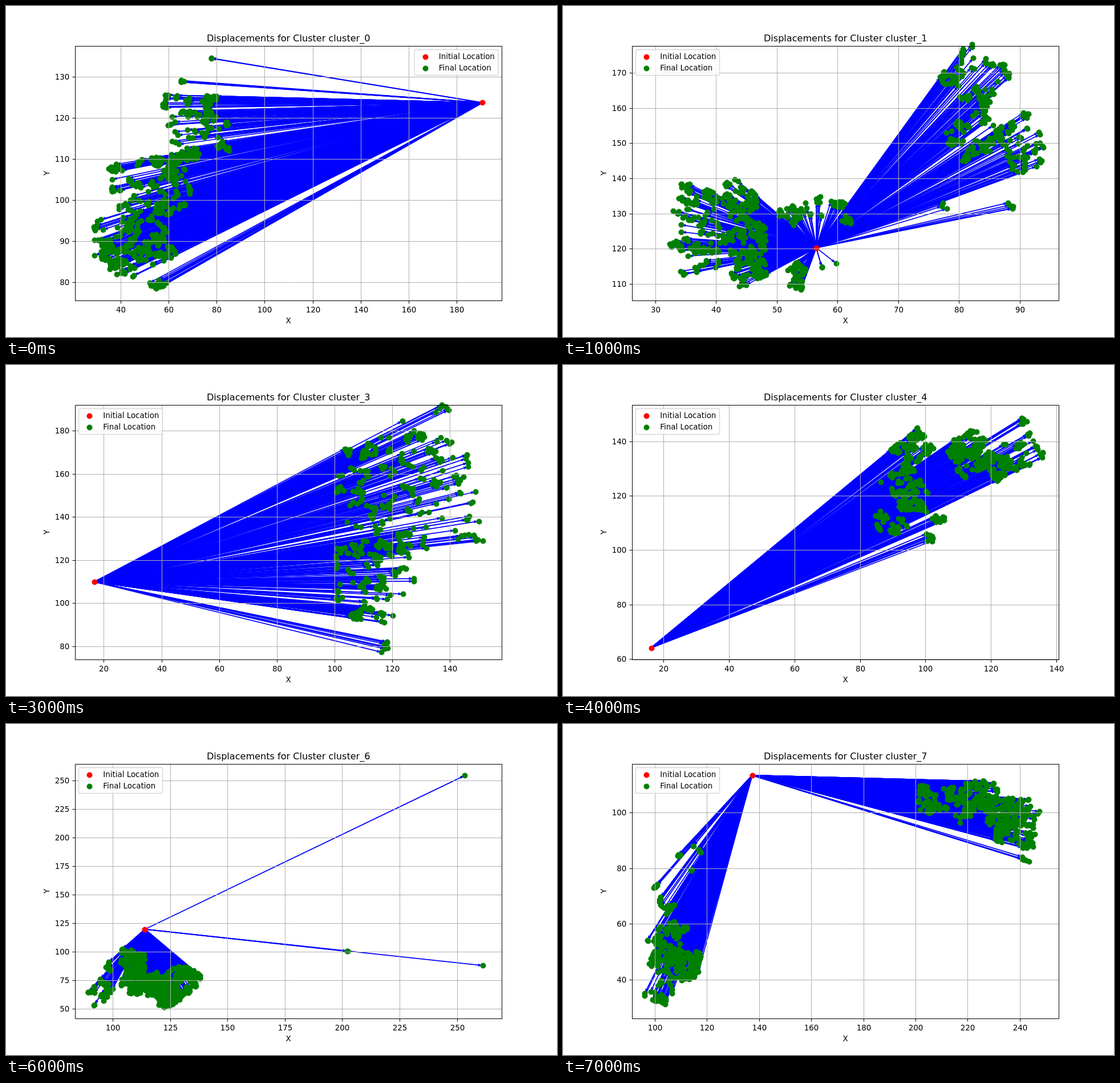
Animation, 966 px wide and 580 px high, one loop 8 s. Source, as an HTML page with a canvas:

```html
<!DOCTYPE html>
<html lang="en">
<head>
<meta charset="utf-8">
<title>Cluster displacements</title>
<style>
html, body { margin: 0; width: 966px; height: 580px; overflow: hidden; background: #fff; }
canvas { display: block; }
</style>
</head>
<body>
<canvas id="stage" width="966" height="580"></canvas>
<script>
const ctx = document.getElementById('stage').getContext('2d');
const FRAME = { left: 120.8, top: 69.6, right: 869.4, bottom: 515.8 };
const FONT = '"DejaVu Sans", sans-serif';
const SHAFT = 1.75, DOT = 5, SCENE_MS = 1000, CLUMPING = 0.6, CLUMP_STEP = 14;
const DEGREE = Math.PI / 180;

// Axis: lowest value, highest value, tick step.
// Spray around the origin: from angle, to angle, from distance, to distance, dots.
const scenes = [
  {
    x: [20.94, 198.88, 20], y: [75.63, 137.55, 10], origin: [835.4, 169.3], legendX: 716,
    sprays: [
      [169, 181.4, 447, 560, 150], [160.5, 170.5, 535, 668, 190], [153.5, 163, 600, 715, 170],
      [155.8, 160.5, 685, 722, 70], [150.2, 151.6, 638, 668, 14], [183.9, 184.2, 520, 530, 5],
      [189.2, 189.5, 480, 482, 2], [158.5, 158.5, 731, 731, 1]
    ]
  },
  {
    x: [26.13, 96.47, 10], y: [105.36, 177.68, 10], origin: [443.9, 423.6], legendX: 127.5,
    sprays: [
      [-54, -40, 365, 460, 100], [-42, -29, 295, 390, 90], [-34, -20, 370, 440, 85],
      [-20, -16.5, 232, 243, 4], [-13.2, -11.2, 345, 355, 5], [-74, -54, 80, 92, 14],
      [-48, -35, 65, 78, 12], [-140, -80, 56, 92, 45], [167, 208, 90, 262, 270],
      [205, 221, 125, 195, 60], [152, 168, 95, 155, 60], [110, 146, 42, 88, 40],
      [74, 74, 35, 36, 2], [38, 38, 44, 44, 1]
    ]
  },
  {
    x: [13.19, 89, 10], y: [118.45, 169.53, 10], origin: [154.8, 137.3], legendX: 127.5,
    sprays: [
      [-3, 31.5, 262, 520, 270], [30, 34, 330, 400, 14], [-5, 4, 510, 590, 75],
      [2, 16, 500, 580, 60], [13, 30, 500, 600, 90], [17, 28, 600, 725, 75],
      [35, 35, 542, 542, 1], [37.7, 37.7, 586, 586, 1]
    ]
  },
  {
    x: [10, 158, 20], y: [74, 192, 20], origin: [154.8, 380], legendX: 127.5,
    sprays: [[-28, -5, 450, 690, 260], [-8, 8, 420, 560, 140], [10, 14, 500, 530, 8]]
  },
  {
    x: [10.29, 140.82, 20], y: [59.83, 153.52, 20], origin: [154.8, 495.5], legendX: 127.5,
    sprays: [
      [-39.6, -35, 545, 605, 90], [-36, -27, 495, 555, 90], [-31, -25, 450, 540, 65],
      [-25.5, -23.5, 530, 575, 12], [-24, -20.8, 518, 530, 10], [-34.5, -28.5, 620, 690, 130],
      [-30, -25.8, 670, 745, 85], [-31.8, -31, 755, 772, 9], [-29.6, -25.8, 758, 768, 16]
    ]
  },
  {
    x: [48, 184, 20], y: [34, 140, 20], origin: [835.4, 420], legendX: 127.5,
    sprays: [[181, 207, 420, 600, 280], [178, 190, 560, 680, 130], [209, 213, 500, 530, 8]]
  },
  {
    x: [83.55, 269.58, 25], y: [41.59, 264.96, 25], origin: [243.4, 359.7], legendX: 127.5,
    sprays: [
      [90, 140, 44, 72, 90], [70, 115, 75, 115, 190], [40, 80, 85, 135, 230],
      [64, 76, 125, 140, 30], [118, 132, 115, 148, 35], [130, 144, 82, 95, 10],
      [123.8, 123.8, 158, 160, 2], [-25.66, -25.66, 622.4, 622.4, 1],
      [6.1, 6.4, 356, 358, 2], [6.12, 6.12, 596, 596, 1]
    ]
  },
  {
    x: [91.2, 255, 20], y: [25.99, 117.52, 20], origin: [331.6, 89.8], legendX: 127.5,
    sprays: [
      [106, 119, 330, 380, 150], [113, 122.5, 290, 345, 50], [110, 117, 380, 430, 38],
      [105.3, 108, 325, 370, 28], [121, 127, 265, 288, 18], [130, 133.3, 185, 192, 5],
      [122.6, 131, 158, 163, 5], [122.5, 123, 195, 198, 3], [130, 131.3, 240, 262, 5],
      [3.5, 12, 295, 360, 70], [1.5, 13, 355, 430, 120], [5, 15, 420, 508, 200],
      [16.8, 17.3, 487, 508, 6]
    ]
  }
];

function seeded(seed) {
  let state = seed * 7919 + 17;
  return () => (state = (state * 16807) % 2147483647) / 2147483647;
}

const clamp = (v, lo, hi) => Math.min(hi, Math.max(lo, v));
const snap = v => Math.round(v) + 0.5;

// Many dots stay close to the one before, which gives small clumps.
function spray([ox, oy], [from, to, near, far, count], random) {
  let angle, distance;
  return Array.from({ length: count }, (_, i) => {
    const u = random(), v = random();
    if (i > 0 && random() < CLUMPING) {
      const turn = (u - 0.5) * CLUMP_STEP / distance / DEGREE;
      angle = clamp(angle + turn, from, to);
      distance = clamp(distance + (v - 0.5) * CLUMP_STEP, near, far);
    } else {
      angle = from + u * (to - from);
      distance = near + v * (far - near);
    }
    return [ox + distance * Math.cos(angle * DEGREE), oy + distance * Math.sin(angle * DEGREE)];
  });
}

function arrow([x0, y0], [x1, y1]) {
  const length = Math.hypot(x1 - x0, y1 - y0);
  const half = SHAFT / 2, neck = length - 4.5 * SHAFT, barb = length - 5 * SHAFT;
  const outline = [[0, -half], [neck, -half], [barb, -3 * half], [length, 0],
    [barb, 3 * half], [neck, half], [0, half]];
  ctx.save();
  ctx.translate(x0, y0);
  ctx.rotate(Math.atan2(y1 - y0, x1 - x0));
  ctx.beginPath();
  outline.forEach(([x, y]) => ctx.lineTo(x, y));
  ctx.fill();
  ctx.restore();
}

function dot([x, y], color) {
  ctx.fillStyle = color;
  ctx.beginPath();
  ctx.arc(snap(x), snap(y), DOT, 0, Math.PI * 2);
  ctx.fill();
}

function line(x0, y0, x1, y1, color) {
  ctx.strokeStyle = color;
  ctx.lineWidth = 1;
  ctx.beginPath();
  ctx.moveTo(x0, y0);
  ctx.lineTo(x1, y1);
  ctx.stroke();
}

function text(value, x, y, align = 'center', size = 13.42) {
  ctx.font = `${size}px ${FONT}`;
  ctx.textAlign = align;
  ctx.fillStyle = '#000';
  ctx.fillText(value, x, y);
}

function eachTick([low, high, step], start, end, draw) {
  for (let value = Math.ceil(low / step) * step; value <= high; value += step) {
    draw(snap(start + (value - low) / (high - low) * (end - start)), value);
  }
}

function drawAxes(scene, index) {
  const [left, top, right, bottom] =
    [FRAME.left, FRAME.top, FRAME.right, FRAME.bottom].map(snap);
  eachTick(scene.x, FRAME.left, FRAME.right, (x, value) => {
    line(x, top, x, bottom, '#b0b0b0');
    line(x, bottom, x, bottom + 5, '#000');
    text(value, x, 536.8);
  });
  eachTick(scene.y, FRAME.bottom, FRAME.top, (y, value) => {
    line(left, y, right, y, '#b0b0b0');
    line(left - 5, y, left, y, '#000');
    text(value, 111.3, y + 4.9, 'right');
  });
  ctx.strokeStyle = '#000';
  ctx.strokeRect(left, top, right - left, bottom - top);
  text(`Displacements for Cluster cluster_${index}`, 495.2, 62, 'center', 16.1);
  text('X', 495.2, 555.6);
  ctx.save();
  ctx.translate(76.4, 292.9);
  ctx.rotate(-Math.PI / 2);
  text('Y', 0, 0);
  ctx.restore();
}

function drawLegend(x) {
  ctx.beginPath();
  ctx.roundRect(x, 76.5, 147, 45, 2.7);
  ctx.fillStyle = 'rgba(255,255,255,.8)';
  ctx.fill();
  ctx.strokeStyle = 'rgba(204,204,204,.8)';
  ctx.lineWidth = 1.34;
  ctx.stroke();
  [['Initial Location', '#f00', 89], ['Final Location', '#008000', 109]].forEach(
    ([label, color, y], row) => {
      dot([x + 18.7, y], color);
      text(label, x + 42.8, 93.2 + row * 19.5, 'left');
    });
}

function drawScene(index) {
  const scene = scenes[index];
  const random = seeded(index + 1);
  const ends = scene.sprays.flatMap(area => spray(scene.origin, area, random));
  ctx.fillStyle = '#fff';
  ctx.fillRect(0, 0, 966, 580);
  ctx.fillStyle = '#00f';
  ends.forEach(end => arrow(scene.origin, end));
  ends.forEach(end => dot(end, '#008000'));
  dot(scene.origin, '#f00');
  drawAxes(scene, index);
  drawLegend(scene.legendX);
}

let shown = -1;
const startTime = performance.now();
function tick() {
  const elapsed = Math.max(0, performance.now() - startTime);
  const index = Math.floor(elapsed / SCENE_MS) % scenes.length;
  if (index !== shown) drawScene(shown = index);
  requestAnimationFrame(tick);
}
tick();
</script>
</body>
</html>
```
